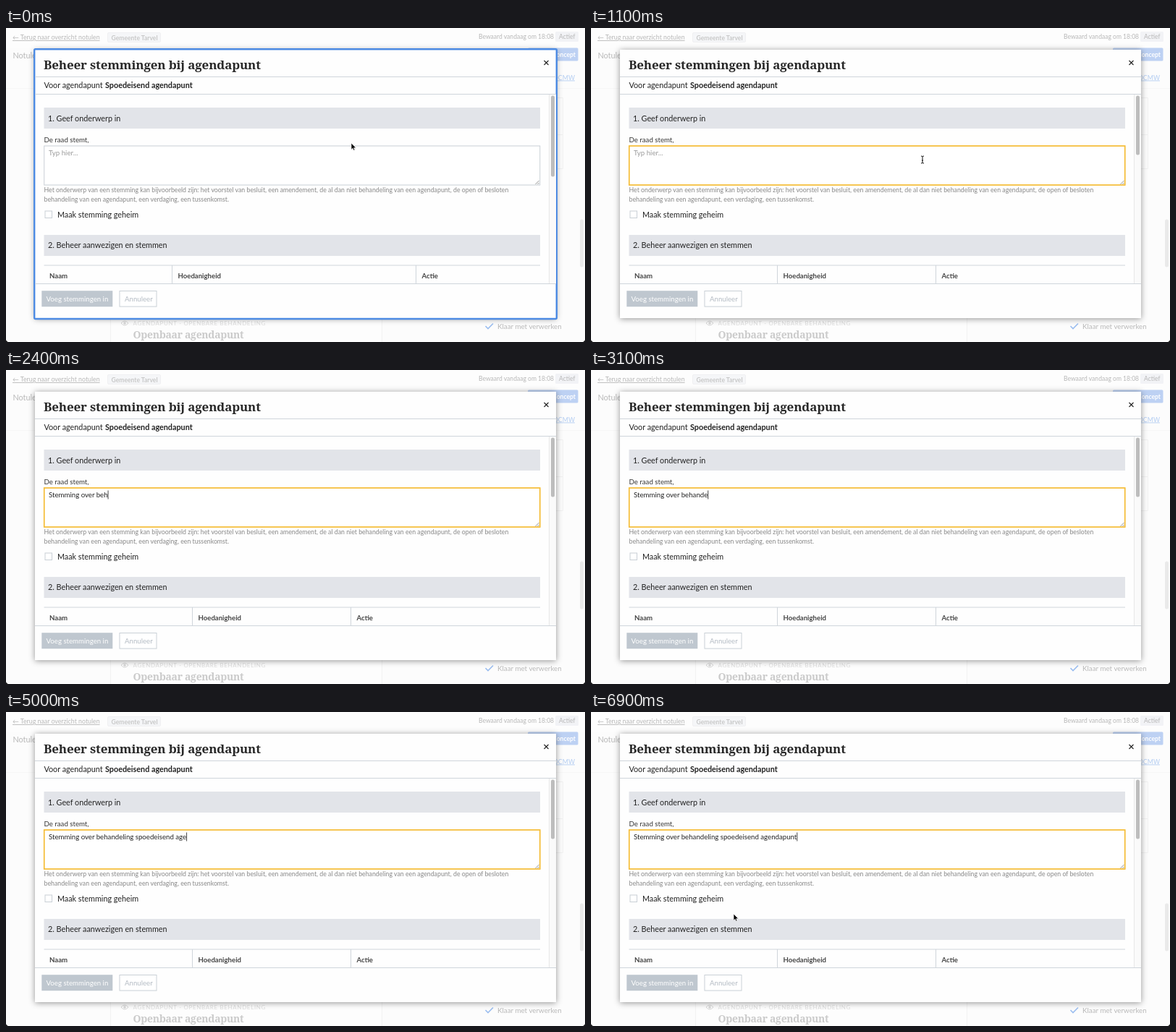
Animation, 800 px wide and 434 px high, one loop 7000 ms. Source, as an HTML page:

```html
<!DOCTYPE html>
<html lang="nl">
<head>
<meta charset="utf-8">
<title>Beheer stemmingen</title>
<style>
  html, body { margin: 0; width: 100%; height: 100%; overflow: hidden; background: #fcfcfc; }
  svg { display: block; width: 800px; height: 434px; }
  text { font-family: Lato, "Open Sans", sans-serif; font-size: 10.8px; fill: #222; white-space: pre; }
  .slab { font-family: "Noto Serif", "DejaVu Serif", serif; font-weight: 700; letter-spacing: -.3px; }
  .title { font-size: 17px; letter-spacing: -.18px; fill: #292929; }
  .field { font-size: 9.67px; }
  .hint { font-size: 8.78px; fill: #888; }
  .head { font-size: 9.6px; font-weight: 700; fill: #444; }
  .faded text { font-size: 8.8px; fill: #b8b8b8; }
  .faded .mid { font-size: 9.8px; }
  .faded .big { font-size: 10.8px; }
  .faded .slab { font-size: 14px; fill: #cbcbcb; }
  .faded .caps { font-size: 8px; fill: #dedede; letter-spacing: .65px; }
  .faded .small { font-size: 8.55px; }
  .faded .chip { fill: #c9c9c9; }
  .bold { font-weight: 700; }
  .link { text-decoration: underline; text-decoration-thickness: .7px; }
  .line { stroke: #cfd5db; fill: none; }
  .box { stroke: #c9d0d6; fill: #fff; }
  .modal { fill: #fefefe; filter: drop-shadow(0 1px 4.5px rgba(0, 0, 0, .42)); }
</style>
</head>
<body>
<svg viewBox="0 0 800 434">
  <rect width="800" height="434" fill="#fcfcfc"/>
  <g class="faded">
    <rect width="800" height="27" fill="#fdfdfd"/>
    <path d="M0 83.5H800" stroke="#f7f7f7"/>
    <text x="9" y="16" class="link">← Terug naar overzicht notulen</text>
    <rect x="140.5" y="6.5" width="73" height="13" rx="1.5" fill="#f5f6f8" stroke="#f0f0f2"/>
    <text x="145.5" y="16.5" class="small bold chip">Gemeente Tarvel</text>
    <text x="653" y="15.2" class="small">Bewaard vandaag om 18:08</text>
    <rect x="759" y="5" width="32" height="14" rx="1.5" fill="#f2f3f6"/>
    <text x="764" y="15" class="small">Actief</text>
    <text x="9.5" y="42" class="big">Notulen</text>
    <rect x="721" y="27.5" width="69.5" height="18" rx="1.5" fill="#bdd1f3"/>
    <text x="787" y="40" text-anchor="end" class="small bold" style="fill:#fff">Concept</text>
    <text x="786" y="71.5" text-anchor="end" class="link" style="fill:#b3cdf2">OCMW</text>
    <path d="M700 96.5H769.5V194.5H700M700 147.5H769.5" fill="none" stroke="#f1f1f1"/>
    <rect x="793" y="264.5" width="5" height="66" rx="2.5" fill="#eaeaea"/>
    <rect x="144.5" y="380" width="375" height="60" fill="#fdfdfd" stroke="#f2f2f2"/>
    <path d="M159 408q5-6 10 0q-5 6-10 0z" fill="none" stroke="#d8d8d8"/>
    <circle cx="164" cy="408" r="1.8" fill="#d8d8d8"/>
    <text x="175.5" y="411" class="caps">AGENDAPUNT - OPENBARE BEHANDELING</text>
    <text x="175.5" y="429" class="slab">Openbaar agendapunt</text>
    <path d="M662.5 412l3.5 3.5l7-7" fill="none" stroke="#9dbff0" stroke-width="1.7"/>
    <text x="679" y="415.5" class="mid">Klaar met verwerken</text>
  </g>
  <path d="M0 431v3h3q-2.5-.5-3-3zM800 431v3h-3q2.5-.5 3-3z"/>

  <rect x="40" y="30" width="720" height="371" class="modal"/>
  <rect id="ring" x="39.2" y="29.2" width="721.6" height="372.8" rx="1.5" fill="none" stroke="#4d8be3" stroke-width="2.4"/>
  <text x="52" y="56.5" class="slab title">Beheer stemmingen bij agendapunt</text>
  <path d="M743.5 45l6 6m0-6l-6 6" stroke="#222" stroke-width="1.1"/>
  <path d="M40 67.5H760M40 91.5H760M40 353.5H760" class="line"/>
  <text x="52.5" y="82.5">Voor agendapunt</text>
  <text x="137" y="82.5" class="bold">Spoedeisend agendapunt</text>

  <rect x="751" y="92" width="9" height="261" fill="#fafafa"/>
  <path d="M750.5 92V353" stroke="#e8e8e8"/>
  <rect id="thumb" x="753" y="93.5" width="5" rx="2.5" fill="#bdbdbd"/>

  <path d="M52.5 110h685.5v29h-685.5zM52.5 286h685.5v29h-685.5z" fill="#e2e4e9"/>
  <text x="58" y="128.5">1. Geef onderwerp in</text>
  <text x="52.5" y="157.5" class="field" style="fill:#333">De raad stemt,</text>
  <rect id="area" x="52.75" y="163" width="685" height="54" class="box"/>
  <path d="M731.5 216l5-5M734.5 216l2-2" stroke="#777" stroke-width=".8"/>
  <text id="empty" x="59" y="176" class="field" style="fill:#9a9a9a">Typ hier...</text>
  <text id="typed" x="59" y="176" class="field" xml:space="preserve"></text>
  <rect id="caret" y="166.5" width=".9" height="12" fill="#333"/>
  <text x="52.5" y="227" class="hint">Het onderwerp van een stemming kan bijvoorbeeld zijn: het voorstel van besluit, een amendement, de al dan niet behandeling van een agendapunt, de open of besloten</text>
  <text x="52.5" y="240" class="hint">behandeling van een agendapunt, een verdaging, een tussenkomst.</text>
  <rect x="54" y="253" width="9.5" height="9.5" class="box"/>
  <text x="71" y="262">Maak stemming geheim</text>
  <text x="58" y="304">2. Beheer aanwezigen en stemmen</text>

  <path d="M52.5 328H738" class="line"/>
  <path id="columns" class="line"/>
  <text x="60" y="345.5" class="head">Naam</text>
  <text id="role" y="345.5" class="head">Hoedanigheid</text>
  <text id="action" y="345.5" class="head">Actie</text>

  <rect x="49.3" y="363.2" width="98" height="22" fill="#bfc7cf"/>
  <text x="55.5" y="377.8" class="field" style="fill:#fff">Voeg stemmingen in</text>
  <rect x="157" y="363.5" width="51" height="21.5" class="box"/>
  <text x="164" y="377.8" class="field" style="fill:#b3bbc3">Annuleer</text>

  <path id="arrow" d="M0 0V9.2L2.1 7.3L3.5 10.3L5 9.6L3.7 6.7H6.6Z" fill="#000" stroke="#fff" stroke-width=".7"/>
  <path id="beam" d="M-2-5Q0-5 0-4Q0-5 2-5M0-4V4M-2 5Q0 5 0 4Q0 5 2 5M-1 1H1" fill="none" stroke="#111"/>
</svg>
<script>
const $ = id => document.getElementById(id);
const LOOP = 7000, STEP = 100;
const FOCUS = 300, LOADED = 700, FIRST_KEY = 1200;
const PHRASE = "Stemming over behandeling spoedeisend agendapunt";

// [time, characters typed]
const KEYS = [[1100, 0], [1600, 5], [1800, 9], [2400, 17], [2600, 19], [2900, 20], [3100, 21],
  [3800, 31], [4000, 32], [4200, 33], [4300, 34], [5600, 48]];
// [time, x, y]
const MOUSE = [[0, 477, 159], [100, 475, 162], [300, 458, 182], [6200, 458, 182],
  [6400, 380, 232], [6700, 215, 284], [6900, 197, 279]];

function along(points, t) {
  const i = points.findIndex(p => p[0] > t);
  if (i === 0) return points[0].slice(1);
  if (i < 0) return points[points.length - 1].slice(1);
  const a = points[i - 1], b = points[i];
  const k = (t - a[0]) / (b[0] - a[0]);
  return a.slice(1).map((v, j) => v + (b[j + 1] - v) * k);
}

const typedAt = t => Math.floor(along(KEYS, t)[0] + 1e-6);

function lastKey(t) {
  const n = typedAt(t);
  while (t > FOCUS && typedAt(t - STEP) === n) t -= STEP;
  return t;
}

function set(id, attrs) {
  for (const name in attrs) $(id).setAttribute(name, attrs[name]);
}

const show = (id, on) => { $(id).style.display = on ? "" : "none"; };

function drawField(t) {
  const focused = t >= FOCUS, n = typedAt(t);
  $("area").style.stroke = focused ? "#f5bc35" : "";
  $("area").style.strokeWidth = focused ? 1.7 : 1;
  show("ring", !focused);
  show("empty", n === 0);
  $("typed").textContent = PHRASE.slice(0, n);
  const width = n ? $("typed").getComputedTextLength() : 0;
  set("caret", { x: 59 + width });
  show("caret", focused && (t - lastKey(t)) % 1000 < 500);
}

function drawTable(t) {
  const [a, b, thumb] = t < LOADED ? [229.5, 566.5, 112] : [257.5, 476.5, 82];
  set("columns", { d: `M${a} 328V353M${b} 328V353` });
  set("role", { x: a + 8 });
  set("action", { x: b + 8 });
  set("thumb", { height: thumb });
}

function drawMouse(t) {
  const [x, y] = along(MOUSE, t);
  const visible = t < FIRST_KEY || t >= 6200;
  const inField = y > 163 && y < 217;
  for (const id of ["arrow", "beam"]) {
    set(id, { transform: `translate(${x} ${y})` });
    show(id, visible && inField === (id === "beam"));
  }
}

function frame() {
  const t = Math.floor(performance.now() % LOOP / STEP) * STEP;
  drawField(t);
  drawTable(t);
  drawMouse(t);
  requestAnimationFrame(frame);
}
frame();
</script>
</body>
</html>
```
